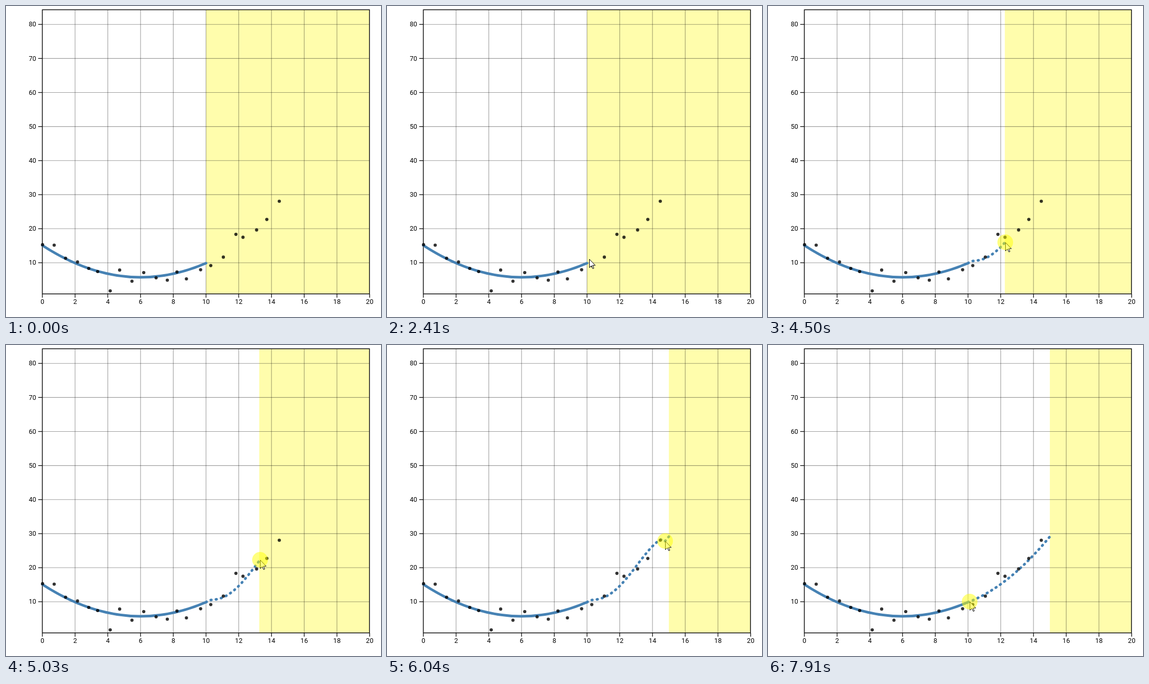
Animation of 716x595 px, one loop 7990 ms. Source, as an HTML page:

```html
<!DOCTYPE html>
<html lang="en">
<head>
<meta charset="utf-8">
<title>Draw the trend</title>
<style>
  html, body { margin: 0; width: 100%; height: 100%; overflow: hidden; background: #fff; }
  svg { display: block; }
  text { font: 12.5px Roboto, Arial, sans-serif; fill: #000; }
  .grid { stroke: rgba(0, 0, 0, .38); stroke-width: 1.1; }
  .tick { stroke: #000; stroke-width: 1.25; }
  .frame { fill: none; stroke: #111; stroke-width: 1.5; }
  .trend { fill: none; stroke: steelblue; stroke-width: 5; stroke-linecap: round; }
  .drawn { stroke-dasharray: 1.25 8.75; stroke-linejoin: round; }
</style>
</head>
<body>
<svg width="716" height="595" viewBox="0 0 716 595">
  <rect id="band" y="7" height="543.7" fill="#fffdac"/>
  <g id="axes"></g>
  <path class="frame" d="M69.4 7.2H694V550.8H69.4Z"/>
  <path class="trend" d="M69.4 458Q225.6 559.7 381.9 492"/>
  <polyline id="drawn" class="trend drawn"/>
  <g id="dots" fill="#000" fill-opacity=".8"></g>
  <g id="pointer">
    <path fill="#fff" stroke="#000" d="M.5 .5V16.5L4.2 12.9L6.9 18.6L9 17.7L6.5 12.2H11.6Z"/>
    <circle id="press" r="15" fill="#ff0" fill-opacity=".5"/>
  </g>
</svg>
<script>
const LOOP = 7990, ENTER = 130, PRESS = 3020, DRAG = 3490, TURN = 6000, END = 7910;
const BEAT = 77.5;                      // the pointer moves in steps
const X0 = 69.4, UNIT = 31.25, CELL = UNIT / 4, CELLS = 20;
const px = v => X0 + v * UNIT;
const py = v => 491.2 - (v - 10) * 6.514;
const $ = id => document.getElementById(id);

function add(parent, tag, attrs, label = "") {
  const el = document.createElementNS("http://www.w3.org/2000/svg", tag);
  for (const k in attrs) el.setAttribute(k, attrs[k]);
  el.textContent = label;
  parent.appendChild(el);
}

const line = (cls, x1, y1, x2, y2) => add($("axes"), "line", { class: cls, x1, y1, x2, y2 });

for (let v = 0; v <= 20; v += 2) {
  const x = px(v);
  if (v % 20) line("grid", x, 7, x, 550);
  line("tick", x, 551, x, 558);
  add($("axes"), "text", { x, y: 570.4, "text-anchor": "middle" }, v);
}
for (let v = 10; v <= 80; v += 10) {
  const y = py(v);
  line("grid", X0, y, 694, y);
  line("tick", 61.5, y, X0, y);
  add($("axes"), "text", { x: 57.5, y: y + 4.2, "text-anchor": "end" }, v);
}

// The observations of the scatter plot.
const dots = [
  [69.8, 456.7], [92, 457.5], [113.8, 482.5], [136.5, 489.7], [158, 502], [175, 508],
  [199, 545], [217, 505.2], [240.5, 526.5], [263, 510], [286.6, 520], [308, 524.5],
  [326.4, 508.8], [344.5, 522], [371.6, 504.6], [391, 496.6], [415, 480.4], [439, 436.8],
  [452.5, 442.4], [478.5, 428.4], [498, 408.3], [521.8, 373.5]
];
dots.forEach(([cx, cy]) => add($("dots"), "circle", { cx, cy, r: 3.1 }));

// Hovering before the drag: time, x, y.
const hover = [
  [ENTER, 538, 580], [210, 478, 547], [360, 476, 545], [1070, 429, 485],
  [1460, 440, 481], [1930, 393, 481], [2410, 386, 484], [DRAG, 386, 487]
];

const lerp = (a, b, k) => a + (b - a) * k;
const clamp = (v, lo, hi) => Math.min(hi, Math.max(lo, v));

// Travel from a to b, slowing down by the amount s.
function glide(t, t0, t1, a, b, s) {
  const k = clamp((t - t0) / (t1 - t0), 0, 1);
  return lerp(a, b, k + s * k * (1 - k));
}

// Heights of the hand-drawn line on the way out and on the way back.
function rise(x) {
  const u = clamp((x - 386) / 150, 0, 1) ** 1.25;
  return 488 - 120 * u * u * (3 - 2 * u);
}
function fall(x) {
  const u = (x - 385) / 152;
  return 491 - 61.5 * (u + u * u);
}

function tip(t) {
  if (t >= TURN) {
    const x = glide(t, TURN, END, 536, 385, .33);
    return [x, fall(x)];
  }
  if (t >= DRAG) {
    const x = glide(t, DRAG, TURN, 386, 536, .18);
    return [x, rise(x)];
  }
  const i = Math.max(1, hover.findIndex(p => p[0] >= t));
  const [t0, x0, y0] = hover[i - 1], [t1, x1, y1] = hover[i];
  const k = clamp((t - t0) / (t1 - t0), 0, 1);
  return [lerp(x0, x1, k), lerp(y0, y1, k)];
}

function render(time) {
  const t = DRAG + BEAT * Math.floor((time - DRAG) / BEAT + .2);
  const [x, y] = tip(t);
  const here = clamp(Math.round((x - px(10)) / CELL), 1, CELLS);
  const reach = t < DRAG ? 0 : t < TURN ? here : CELLS;
  const edge = px(10) + reach * CELL;

  const points = [[px(10), 492]];
  for (let i = 1; i <= reach; i++) {
    const cx = px(10) + i * CELL;
    points.push([cx, t >= TURN && i >= here ? fall(cx) : rise(cx)]);
  }
  $("drawn").setAttribute("points", reach ? points.join(" ") : "");
  $("band").setAttribute("x", edge);
  $("band").setAttribute("width", 694 - edge);
  $("pointer").setAttribute("transform", `translate(${Math.round(x)} ${Math.round(y)})`);
  $("pointer").style.display = time < ENTER ? "none" : "";
  $("press").style.display = time < PRESS ? "none" : "";
}

const start = performance.now();
function tick() {
  render((performance.now() - start) % LOOP);
  requestAnimationFrame(tick);
}
tick();
</script>
</body>
</html>
```
